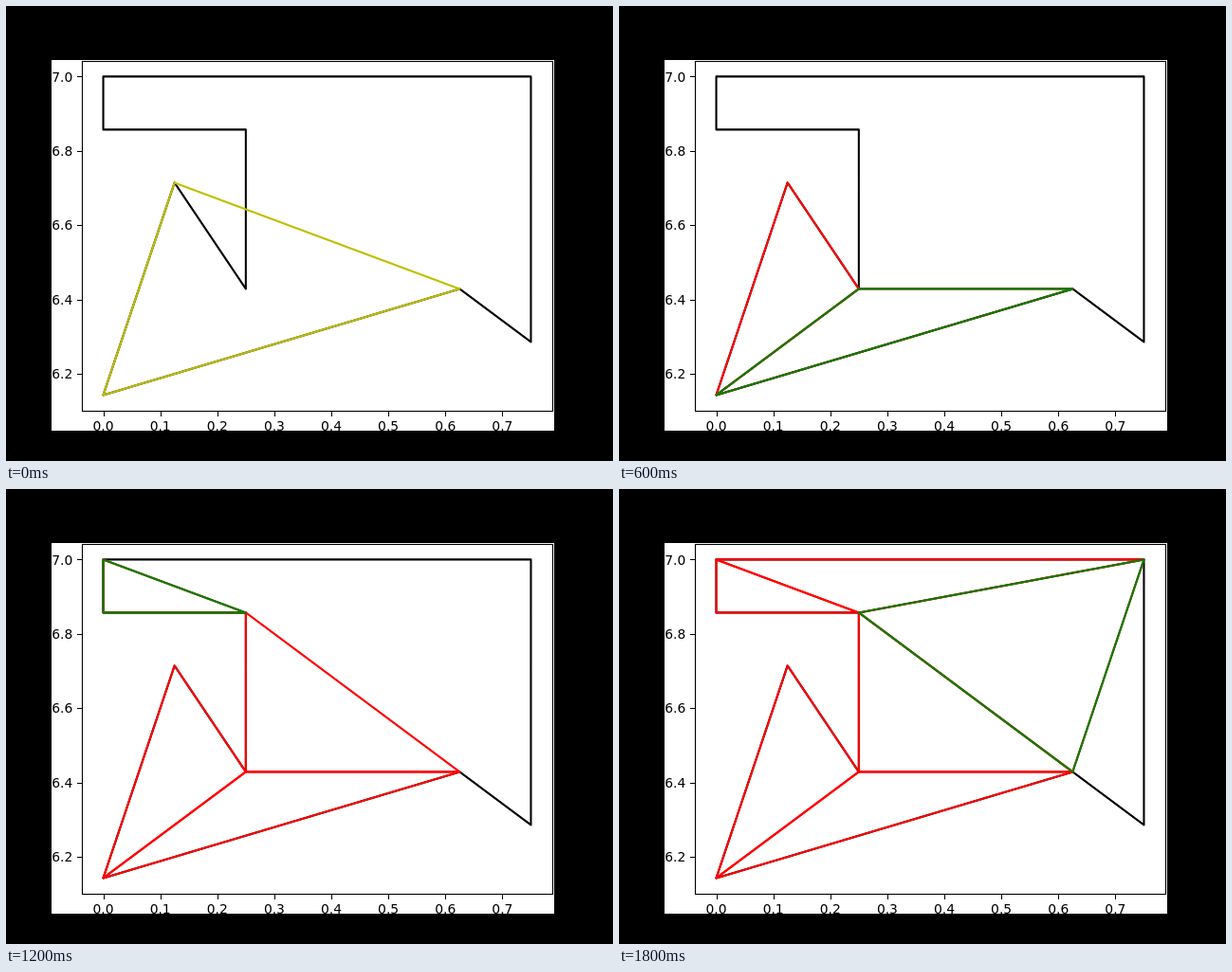
These frames come from a looping animation (640 px wide and 480 px high, 2000 ms). An HTML page with a canvas:

```html
<!DOCTYPE html>
<html>
<head>
<meta charset="utf-8">
<title>Ear clipping triangulation</title>
<style>
  html, body { margin: 0; width: 640px; height: 480px; overflow: hidden; background: #000; }
  canvas { display: block; }
</style>
</head>
<body>
<canvas id="plot" width="640" height="480"></canvas>
<script>
const ctx = document.getElementById('plot').getContext('2d');
const STEP_MS = 200;
const RED = '#f00', YELLOW = '#bfbf00', GREEN = '#008000';

// Plot geometry in pixels
const X0 = 102.545, X_SCALE = 601.212;
const Y7 = 74.4, Y_SCALE = 392;

// Vertices in units of 1/8 along x and 1/7 down from y = 7
const vertices = {
  A: [0, 0], B: [6, 0], C: [6, 5], D: [5, 4], E: [0, 6],
  F: [1, 2], G: [2, 4], H: [2, 1], I: [0, 1]
};
const OUTLINE = 'ABCDEFGHI';
const EARS = ['EFG', 'DEG', 'GDH', 'AIH', 'AHB', 'HDB', 'BCD'];

// Rejected candidates are yellow; accepted ears are green.
const steps = [
  { cut: 0, tri: 'DEF', color: YELLOW },
  { cut: 7, done: true },
  { cut: 1, tri: 'EFG', color: GREEN },
  { cut: 2, tri: 'DEG', color: GREEN },
  { cut: 3, tri: 'GDH', color: GREEN },
  { cut: 3, tri: 'HID', color: YELLOW },
  { cut: 4, tri: 'AIH', color: GREEN },
  { cut: 4, tri: 'AHD', color: YELLOW },
  { cut: 5, tri: 'AHB', color: GREEN },
  { cut: 6, tri: 'HDB', color: GREEN }
];

function polygon(names, color) {
  ctx.beginPath();
  for (const name of names) {
    const [u, v] = vertices[name];
    ctx.lineTo(X0 + u * X_SCALE / 8, Y7 + v * Y_SCALE / 7);
  }
  ctx.closePath();
  ctx.strokeStyle = color;
  ctx.lineWidth = 2.083;
  ctx.lineJoin = 'round';
  ctx.stroke();
}

function drawAxes() {
  ctx.fillStyle = '#000';
  ctx.font = '13.889px "DejaVu Sans", sans-serif';
  ctx.textBaseline = 'alphabetic';

  ctx.textAlign = 'center';
  for (let i = 0; i < 8; i++) {
    const x = X0 + i * X_SCALE / 10;
    ctx.fillRect(Math.round(x), 428, 1, 5);
    ctx.fillText((i / 10).toFixed(1), x, 448);
  }

  ctx.textAlign = 'right';
  for (let i = 0; i < 5; i++) {
    const y = Y7 + i * Y_SCALE / 5;
    ctx.fillRect(75, Math.round(y), 5, 1);
    ctx.fillText((7 - i / 5).toFixed(1), 70.3, Math.round(y + 5.2));
  }

  ctx.strokeStyle = '#000';
  ctx.lineWidth = 1.111;
  ctx.lineJoin = 'miter';
  ctx.strokeRect(80.5, 58.5, 496, 369);
}

function draw(now) {
  const step = steps[Math.floor(now / STEP_MS) % steps.length];
  ctx.fillStyle = '#000';
  ctx.fillRect(0, 0, 640, 480);
  ctx.fillStyle = '#fff';
  ctx.fillRect(48, 57, 530, 391);

  if (!step.done) polygon(OUTLINE, '#000');
  EARS.slice(0, step.cut).forEach(ear => polygon(ear, RED));
  if (step.tri) polygon(step.tri, step.color);
  drawAxes();
}

const start = performance.now();
function tick() {
  draw(performance.now() - start);
  requestAnimationFrame(tick);
}
tick();
</script>
</body>
</html>
```
